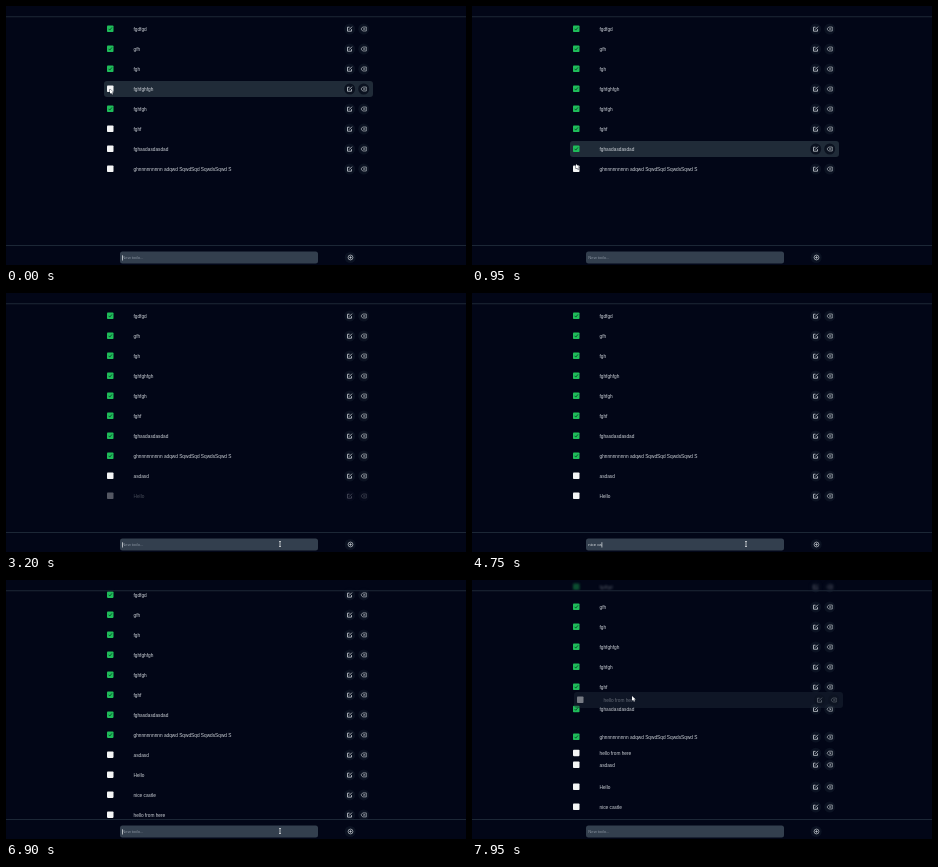
An HTML page with a canvas for the animation above (8000 ms loop, 460 by 259 pixels).

```html
<!DOCTYPE html>
<html lang="en">
<head>
<meta charset="utf-8">
<style>
html, body { margin: 0; width: 100%; height: 100%; overflow: hidden; background: #020617; }
canvas { display: block; width: 460px; height: 259px; }
</style>
</head>
<body>
<canvas id="stage" width="460" height="259"></canvas>
<script>
const ctx = document.getElementById('stage').getContext('2d');
const LOOP = 8000, PITCH = 20, DRAG = 7650;
const BG = '#020617', LINE = '#1c2736', HOVER = '#202b38', FIELD = '#333f4e', INK = '#cbd0d6';

// done: time the box gets ticked, born: time the row is added
const todos = [
  { text: 'fgdfgd', done: 0 },
  { text: 'gfh', done: 0 },
  { text: 'fgh', done: 0 },
  { text: 'fghfghfgh', done: 200 },
  { text: 'fghfgh', done: 0 },
  { text: 'fghf', done: 550 },
  { text: 'fghasdasdasdad', done: 750 },
  { text: 'ghnnnnnnnnn adqwd SqwdSqd SqwdsSqwd S', done: 1050 },
  { text: 'asdasd', born: 2200 },
  { text: 'Hello', born: 3200 },
  { text: 'nice castle', born: 5000 },
  { text: 'hello from here', born: 6750 }
];
const last = todos.length - 1;

// start, end, text already there, text typed, time the text is gone
const typing = [
  [1650, 2000, '', 'asdasd', 2200],
  [2850, 3100, '', 'Hello', 3200],
  [4150, 4450, '', 'nice c', 4750],
  [4750, 4950, 'nice c', 'astle', 5000],
  [5450, 5650, '', 'hel', 5800],
  [5800, 5850, 'hel', 'lo', 6150],
  [6150, 6350, 'hello', ' from', 6600],
  [6600, 6720, 'hello from', ' here', 6750]
];
const caretOn = [[0, 50], [1600, 3800], [4150, 7250]];

// time, x, y
const pointer = [
  [0, 104, 83], [200, 104, 83], [400, 104, 102], [550, 104, 122], [700, 104, 140],
  [850, 104, 143], [950, 104, 158], [1050, 104, 163], [1150, 106, 176], [1200, 112, 191],
  [1300, 112, 191], [1550, 304, 247], [2200, 304, 247], [2600, 274, 251], [7200, 274, 251],
  [7320, 200, 234], [7400, 174, 231], [7450, 157, 223], [DRAG, 157, 223], [7950, 160, 116], [LOOP, 160, 116]
];

const clamp = v => Math.max(0, Math.min(1, v));
const smooth = v => (v = clamp(v)) * v * (3 - 2 * v);

function pointerAt(t) {
  const i = Math.max(1, pointer.findIndex(p => p[0] >= t));
  const [t0, x0, y0] = pointer[i - 1], [t1, x1, y1] = pointer[i];
  const k = clamp((t - t0) / (t1 - t0));
  return [x0 + (x1 - x0) * k, y0 + (y1 - y0) * k];
}

function box(x, y, w, h, r, color) {
  ctx.fillStyle = color;
  ctx.beginPath();
  ctx.roundRect(x, y, w, h, r);
  ctx.fill();
}

function stroke(path, color, width) {
  ctx.strokeStyle = color;
  ctx.lineWidth = width;
  ctx.stroke(new Path2D(path));
}

function label(text, x, y, size, color) {
  ctx.font = `${size}px "Liberation Sans", Arial, sans-serif`;
  ctx.textBaseline = 'alphabetic';
  ctx.fillStyle = color;
  ctx.fillText(text, x, y);
}

function drawRow(todo, x, y, t, { hover = false, alpha = 1 } = {}) {
  const done = t >= todo.done;
  ctx.save();
  ctx.translate(x, y);
  ctx.globalAlpha *= alpha;
  if (hover) box(98, -8, 269, 16, 3, HOVER);
  box(101, -3.5, 6.5, 6.5, .8, done ? '#1fbd5a' : '#f4f5f6');
  if (done) stroke('M102.6 -.2l1.2 1.3l2.2 -2.7', '#0a3a2a', .8);
  label(todo.text, 127.5, 1.6, 4.75, INK);
  for (const cx of [343.7, 357.7]) box(cx - 5.5, -5.5, 11, 11, 5.5, hover ? '#0b1220' : '#0b1222');
  stroke('M343.5 -1.8h-2v4h4v-2M343 .7l3 -3', INK, .8);
  stroke('M355 0l1.7 -2h3.6v4h-3.6zM357.4 -.8l1.6 1.6m0 -1.6l-1.6 1.6', INK, .6);
  ctx.restore();
}

function drawList(t, scroll) {
  const [, hoverY] = pointerAt(t - 60);
  const [px, py] = pointerAt(t);
  const [gx, gy] = pointerAt(DRAG);
  const dragging = t > DRAG;
  const slot = i => 23 + PITCH * i - scroll;
  const ghostY = slot(last) + py - gy;
  // Rows make room one after another as the dragged row passes them
  const passed = i => DRAG + (last - i) * 57;
  todos.forEach((todo, i) => {
    if (t < (todo.born || 0)) return;
    let y = slot(i);
    if (dragging && i < last) y += PITCH * clamp((t - passed(i)) / 145);
    if (dragging && i === last)
      for (let j = 6; j < last; j++) y -= PITCH * clamp((t - passed(j)) / 240);
    const hover = !dragging && hoverY < 239 && Math.abs(hoverY - y) <= 8.5;
    const alpha = todo.born ? clamp((t - todo.born + 50) / 150) : 1;
    drawRow(todo, 0, y, t, { hover, alpha });
  });
  if (dragging) drawRow(todos[last], 4 * clamp((px - gx) / 3), ghostY, t, { hover: true, alpha: .45 });
}

function clipped(y, h, draw) {
  ctx.save();
  ctx.beginPath();
  ctx.rect(0, y, 460, h);
  ctx.clip();
  draw();
  ctx.restore();
}

function drawFooter(t) {
  box(114, 245.5, 198, 12, 2.5, FIELD);
  const part = typing.find(p => t >= p[0] && t < p[4]);
  let text = '';
  if (part) {
    const [start, end, before, added] = part;
    text = before + added.slice(0, Math.floor((t - start) / (end - start) * added.length) + 1);
  }
  label(text || 'New todo...', 116.3, 253.2, 4.2, text ? '#e2e5e9' : '#8993a0');
  if (caretOn.some(([a, b]) => t >= a && t < b))
    box(116.3 + ctx.measureText(text).width, 249.2, .7, 5.3, 0, '#e2e5e9');
  box(338.7, 246, 11, 11, 5.5, '#0b1222');
  stroke('M346.9 251.5a2.4 2.4 0 1 1 -4.8 0a2.4 2.4 0 1 1 4.8 0M343.2 251.5h2.6M344.5 250.2v2.6', INK, .7);
}

function drawPointer(t) {
  const [x, y] = pointerAt(t);
  ctx.save();
  ctx.translate(x, y);
  if (y > 244) {
    stroke('M-1 -2.5h2M0 -2.5v5M-1 2.5h2', '#e8eaed', .7);
  } else {
    const arrow = 'M0 0v4.8l1.2 -1l.8 1.8l.9 -.4l-.8 -1.7h1.6z';
    stroke(arrow, '#111827', .8);
    ctx.fillStyle = '#fff';
    ctx.fill(new Path2D(arrow));
  }
  ctx.restore();
}

function draw(t) {
  const scroll = 16 * smooth((t - 6750) / 300);
  box(0, 0, 460, 259, 0, BG);
  clipped(11, 228, () => drawList(t, scroll));
  if (scroll) clipped(0, 11, () => {
    ctx.globalAlpha = .4;
    ctx.filter = 'blur(1.2px)';
    drawRow(todos[0], 0, 23 - scroll, t);
  });
  box(0, 10.3, 460, 1, 0, LINE);
  box(0, 239, 460, 1, 0, LINE);
  drawFooter(t);
  drawPointer(t);
}

function tick() {
  draw(performance.now() % LOOP);
  requestAnimationFrame(tick);
}
tick();
</script>
</body>
</html>
```
